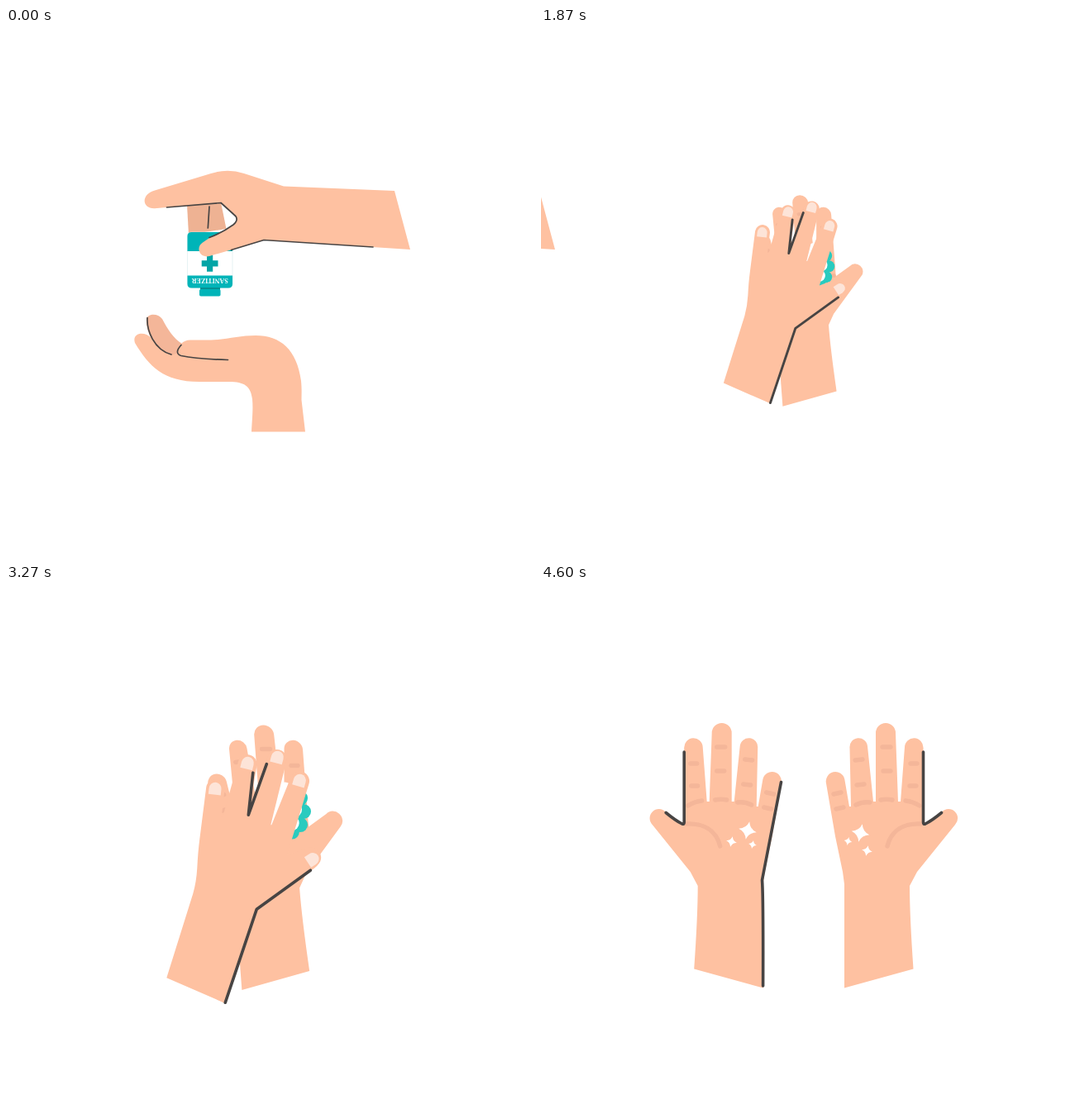
These frames come from a looping animation (640 px wide and 640 px high, 5.63 s). An HTML page:

```html
<!DOCTYPE html>
<html lang="en">
<head>
<meta charset="utf-8">
<title>Hand sanitizer</title>
<style>
  html, body { margin: 0; width: 100%; height: 100%; overflow: hidden; background: #fff; }
  svg { display: block; width: 100vw; height: 100vh; }
  .skin { fill: #fec1a1; }
  .shade { fill: #f4b699; }
  .teal { fill: #00b4b8; }
  .line { fill: none; stroke: #474443; stroke-linecap: round; stroke-linejoin: round; }
  .thin { stroke-width: 1.7; }
  .bold { stroke-width: 3.6; }
  .crease { fill: none; stroke: #f4b699; stroke-width: 5.4; stroke-linecap: round; }
  .back .skin { fill: #f4b699; }
  .back .crease { stroke: #fec1a1; }
  .nail { fill: #fde4d8; }
</style>
</head>
<body>
<svg viewBox="0 0 640 640">
  <defs>
    <g id="palm">
      <path class="skin" d="M367 487.500V362L365 347L356 304L345 240A11.300 11.300 0 0 1 367.300 235L373 268H375L373.500 197A10.700 10.700 0 0 1 395 195L402 262H405V179A12 12 0 0 1 429 179L432 262H435L440 196A11.200 11.200 0 0 1 462.500 197V290L485 274.500A11 11 0 0 1 501 290L455 347L446 364Q446 400 450.500 464.500Z"/>
      <path class="crease" d="M447 216h8M446 243h8M413 196h10M414 225h9M380 212l9-1M382 242l9-1M354 253l9-2M357 271l9-2M381 266Q389 262 398 263M411 260Q418 258.500 425 260M441 261Q450 262 458 267M419 316C424 296 440 288 460 289"/>
    </g>
    <path id="thumbLine" class="line bold" d="M462.500 202V287Q462.500 290 465 289Q473 285 484.500 275.500"/>
    <path id="star" fill="#fff" d="M0-1Q.2-.2 1 0Q.2.2 0 1Q-.2.2-1 0Q-.2-.2 0-1Z"/>
    <path id="nail" class="nail" d="M-7.500 7V0A7.500 8 0 0 1 7.500 0V7Z"/>
  </defs>

  <g id="dispense">
    <g id="midFinger">
      <path class="shade" style="fill:#eeb293" d="M219 214L260 211L266.500 243L221 250Z"/>
      <path class="line thin" d="M246 216L244.300 242"/>
    </g>
    <g id="bottle">
      <rect x="219.500" y="247" width="54.500" height="67.500" rx="5" fill="#fff" stroke="#dcecee" stroke-width=".7"/>
      <path class="teal" d="M219.500 270V252Q219.500 247 224.500 247H269Q274 247 274 252V270Z"/>
      <path class="teal" d="M219.500 299.500H274V309.500Q274 314.500 269 314.500H224.500Q219.500 314.500 219.500 309.500Z"/>
      <rect x="235" y="314" width="24" height="3" fill="#078f92"/>
      <rect class="teal" x="234" y="316" width="25.500" height="8.500" rx="1.800"/>
      <path fill="#04a5a6" d="M243 275h7.200v6.300h6.300v7.200h-6.300v6.300h-7.200v-6.300h-6.300v-7.200h6.300Z"/>
      <text transform="translate(246.700 303.300) rotate(180)" text-anchor="middle" font-family="'Liberation Serif', serif" font-weight="700" font-size="8" fill="#fff">SANITIZER</text>
    </g>
    <path id="topHand" class="skin"/>
    <path id="topLine" class="line thin"/>
    <path class="line thin" d="M272.500 268.500L312 256.500L444 265"/>
    <ellipse id="drop" cx="246.700" rx="3.600" ry="5" fill="#1fb3b1"/>
    <path id="gel" fill="#1fb3b1" d="M-15 3Q-15-2.500-9-2.500Q-5-2.500-3-1.500Q0-2.500 4-1.500Q7-3 11-2.500Q14-2 14 3Z"/>
    <path class="shade" d="M170 352C172 345 184 345 189 352C196 365 202 375 213 382L209 398L196 396C178 387 169 366 170 352Z"/>
    <path class="skin" d="M156 381C152 369 167 366 176 375C181 385 190 393 200 396L208 393Q206 388 212 382Q216 377.500 223 377.500H248C270 376.500 283 372 302 372C332 372 352 389 357 427C358 437 357.500 443 357.500 450L362 488.500H297C298 470 299 461 298 449C296 433 288 428 270 428H234C190 428 173 409 156 381Z"/>
    <path class="line thin" d="M171 350.500C170 366 179 389 200 395M212 383.500C205 391 207 395 212 396.500C228 400 250 401 268.500 401.500"/>
  </g>

  <g id="rub">
    <g id="backHand" class="back"><use href="#palm" transform="matrix(1 0 .075 1 -103.500 2.500)"/></g>
    <g id="foam"></g>
    <g id="frontHand">
      <path class="skin" d="M182 478L214 376Q218 362 219 345Q220 325 222 310L230 247A11.200 11.200 0 0 1 252.200 251L248.500 283H250L268.500 217A11.500 11.500 0 0 1 291 222L281 281L304.500 209A12 12 0 0 1 327.500 214L308 293H309L332 236A11.500 11.500 0 0 1 354 244L327.500 330L351 321C362 317 372 327 368 337Q365 343 357 348L291 395L253 509Z"/>
      <use href="#nail" transform="translate(240.700 249.500) rotate(6)"/>
      <use href="#nail" transform="translate(280 218.500) rotate(14)"/>
      <use href="#nail" transform="translate(316 211.500) rotate(15)"/>
      <use href="#nail" transform="translate(343 239.500) rotate(16)"/>
      <use href="#nail" transform="translate(358.500 334.500) rotate(57)"/>
      <path class="line bold" d="M253 508L291 395L356 348M286.500 230L281 281L303 219.500"/>
    </g>
  </g>

  <g id="clean">
    <g id="leftPalm">
      <g transform="matrix(-1 0 0 1 635.700 0)"><use href="#palm"/><use href="#thumbLine"/></g>
      <path class="line bold" d="M290.500 238.500L267.500 357Q269 375 268.600 485"/>
    </g>
    <g id="rightPalm"><use href="#palm"/><use href="#thumbLine"/></g>
    <g id="stars"></g>
  </g>
</svg>

<script>
const LOOP = 5630;
const $ = id => document.getElementById(id);
const set = (id, name, value) => $(id).setAttribute(name, value);
const move = (id, value) => set(id, 'transform', value);
const show = (id, on) => set(id, 'display', on ? 'inline' : 'none');

const span = (t, a, b) => Math.min(1, Math.max(0, (t - a) / (b - a)));
const smooth = p => (1 - Math.cos(Math.PI * p)) / 2;
const outCubic = p => 1 - (1 - p) ** 3;
const inOutCubic = p => p < .5 ? 4 * p ** 3 : 1 - 4 * (1 - p) ** 3;

// Eased value through [time, value] pairs.
function track(t, keys) {
  let v = keys[0][1];
  for (let i = 1; i < keys.length; i++)
    v += (keys[i][1] - keys[i - 1][1]) * smooth(span(t, keys[i - 1][0], keys[i][0]));
  return v;
}

const scaleAt = (x, y, s) => `translate(${x} ${y}) scale(${s}) translate(${-x} ${-y})`;

// Foam: a ring of bubbles, teal on the right rim and white inside.
function buildFoam() {
  const blob = (cx, cy, rx, ry, fill) => {
    let out = `<ellipse cx="${cx}" cy="${cy}" rx="${rx}" ry="${ry}" fill="${fill}"/>`;
    for (let i = 0; i < 9; i++) {
      const a = i * Math.PI * 2 / 9;
      out += `<circle cx="${cx + rx * Math.cos(a)}" cy="${cy + ry * Math.sin(a)}" r="9" fill="${fill}"/>`;
    }
    return out;
  };
  $('foam').innerHTML = blob(337, 296, 17, 25, '#29cbbf') + blob(329, 294, 14, 25, '#fff');
}

const STARS = [[250, 297, 11], [230.5, 310.5, 6.5], [256, 314, 5],
               [386.5, 300, 11], [371.5, 310, 5], [394.5, 321.5, 6.5]];

function drawDispense(t) {
  show('dispense', t < 2150);
  move('dispense', `translate(${-640 * inOutCubic(span(t, 1513, 2113))} 0)`);

  const d = track(t, [[0, 0], [500, 4], [800, 7], [1130, 4]]);
  const x = d / 2;
  set('topHand', 'd', `M194 ${217 + d * .75}L${180 + x} ${218.300 + d * .9}` +
    `C${164 + x} ${219 + d} ${163 + x} ${201 + d} ${180 + x} ${196.500 + d}` +
    `L248 ${176 + d * .1}Q268 169.500 288 176L336 191.500L470 197L489 268L312 256.500L272 268.500` +
    `L246 276C234 279 229 265 238 259.500L246 254Q259 248.500 273 240Q284 232 276 226L260 211.500Z`);
  set('topLine', 'd', `M${194.500 + x} ${217 + d * .75}L260 211.500L275.500 225.500Q283 231 275 238Q262 247.500 246 253.500`);
  move('midFinger', `translate(0 ${d * .3})`);
  move('bottle', scaleAt(246.7, 285, `${1 + d * .009} 1`));

  const fall = span(t, 760, 1090);
  show('drop', fall > 0 && fall < 1);
  set('drop', 'cy', 322 + 54 * fall * fall);
  move('gel', `translate(246.700 377.500) scale(${outCubic(span(t, 1050, 1300))})`);
}

function drawRub(t) {
  const s = outCubic(span(t, 1640, 2200)) * (1 - span(t, 3540, 3690) ** 2);
  show('rub', s > 0);
  const back = track(t, [[1870, -18.4], [2560, 1], [3160, -15.5], [3600, -10]]);
  const front = track(t, [[2100, 20], [2780, -9], [3000, 14], [3500, 11]]);
  const fx = track(t, [[1870, -2], [2530, 0], [3270, 6]]);
  const fy = track(t, [[1870, -8], [2530, 0], [3270, -22]]);
  move('backHand', `translate(${back} 0) ${scaleAt(353, 331, s)}`);
  move('foam', `translate(${fx} ${fy}) ${scaleAt(335, 298, s)}`);
  move('frontHand', `translate(${front} ${-.23 * front}) ${scaleAt(275, 262, s)}`);
}

function drawClean(t) {
  const s = outCubic(span(t, 3690, 4250));
  show('clean', s > 0);
  const sway = Math.sin(Math.PI * span(t, 3880, 4560));
  const pose = (id, x, y, angle) => move(id, `rotate(${angle} ${x} ${y}) ${scaleAt(x, y, s)}`);
  pose('leftPalm', 268, 486, 3.5 * sway);
  pose('rightPalm', 367.5, 487, -6 * sway);
  STARS.forEach(([x, y, r], i) => {
    const grow = outCubic(span(t, 4200 + i % 3 * 50, 4460 + i % 3 * 50));
    $('stars').children[i].setAttribute('transform', `translate(${x} ${y}) rotate(12) scale(${r * grow})`);
  });
}

function draw(t) {
  drawDispense(t);
  drawRub(t);
  drawClean(t);
}

buildFoam();
$('stars').innerHTML = STARS.map(() => '<use href="#star"/>').join('');

const start = performance.now();
function tick() {
  draw((performance.now() - start) % LOOP);
  requestAnimationFrame(tick);
}
draw(0);
requestAnimationFrame(tick);
</script>
</body>
</html>
```
